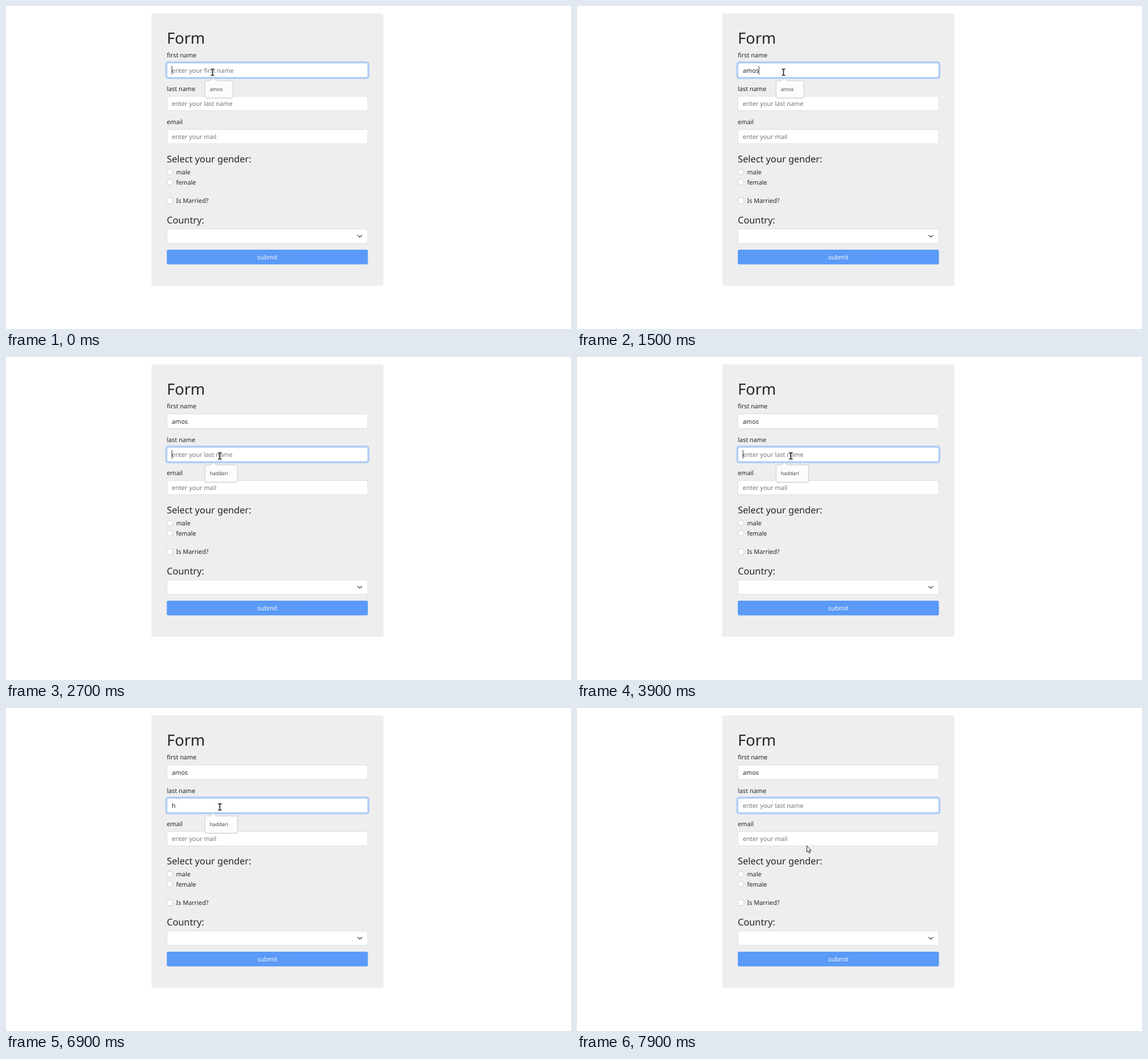
An HTML page for the animation above (8 s loop, 989x566 px).

```html
<!DOCTYPE html>
<html lang="en">
<head>
<meta charset="utf-8">
<title>Form</title>
<style>
html, body { margin: 0; width: 100%; height: 100%; overflow: hidden; background: #fff; }
svg { display: block; width: 989px; height: 566px; }
text { font: 16px "Noto Sans", sans-serif; fill: #212529; text-rendering: geometricPrecision; white-space: pre; }
.h1 { font-size: 40px; }
.h4 { font-size: 24px; }
.box { fill: #fff; stroke: #ced4da; }
.box.on { stroke: #86b7fe; }
.ring { fill: #0d6efd; fill-opacity: .25; visibility: hidden; }
.on + .x, .ring.on { visibility: visible; }
.hint { fill: #6c757d; }
.check { fill: #fff; stroke: #000; stroke-opacity: .25; }
.popup text { font-size: 8.75px; fill: #45474a; }
.popup path { fill: #fcfcfc; stroke: #c6c6c8; stroke-width: .8; }
</style>
</head>
<body>
<svg viewBox="0 0 989 566">
  <defs>
    <filter id="soft" x="-20%" y="-20%" width="140%" height="150%">
      <feDropShadow dx="0" dy=".6" stdDeviation=".6" flood-opacity=".18"/>
    </filter>
  </defs>
  <g transform="translate(254.4 13) scale(.677)">
    <rect width="600" height="705" rx="5" fill="#eee"/>
    <text class="h1" x="40" y="79">Form</text>
    <g id="fields"></g>
    <text class="h4" x="40" y="385.2">Select your gender:</text>
    <circle class="check" cx="48" cy="410.8" r="7.5"/>
    <text x="64" y="417">male</text>
    <circle class="check" cx="48" cy="436.8" r="7.5"/>
    <text x="64" y="443">female</text>
    <rect class="check" x="40.5" y="477.3" width="15" height="15" rx="3.5"/>
    <text x="64" y="491">Is Married?</text>
    <text class="h4" x="40" y="544.2">Country:</text>
    <rect class="box" x="40.5" y="558.1" width="519" height="37" rx="3.5"/>
    <path d="M532.5 574.3l5.5 4.7 5.5-4.7" transform="translate(1 0)" fill="none" stroke="#343a40" stroke-width="1.7" stroke-linecap="round" stroke-linejoin="round"/>
    <g opacity=".65">
      <rect x="40" y="611.6" width="520" height="38" rx="4" fill="#0d6efd"/>
      <text x="300" y="636.6" text-anchor="middle" style="fill:#fff">submit</text>
    </g>
  </g>
  <rect id="caret" width="1" height="15" fill="#212529" opacity=".9"/>
  <g id="popups"></g>
  <g id="beam" fill="none" stroke-linecap="round">
    <path id="beamShape" d="M-2.4-5.5Q0-5.5 0-4.2V4.2Q0 5.5-2.4 5.5M2.4-5.5Q0-5.5 0-4.2M0 4.2Q0 5.5 2.4 5.5" stroke="#fff" stroke-width="3"/>
    <use href="#beamShape" style="display:none"/>
    <path d="M-2.4-5.5Q0-5.5 0-4.2V4.2Q0 5.5-2.4 5.5M2.4-5.5Q0-5.5 0-4.2M0 4.2Q0 5.5 2.4 5.5" stroke="#1c1c1c" stroke-width="1.6"/>
  </g>
  <path id="arrow" d="M.5.6V11.5L3 9.3 4.7 13.2 6.5 12.4 4.9 8.6H8.4Z" fill="#f8f8f8" stroke="#222" stroke-width="1" stroke-linejoin="round"/>
</svg>
<script>
const LOOP = 8000, SCALE = 0.677, TEXT_X = 290.28;
const FIRST = "amos", LAST = "haddari";
const $ = id => document.getElementById(id);

function add(parent, tag, attrs, content = "") {
  const el = document.createElementNS("http://www.w3.org/2000/svg", tag);
  for (const k in attrs) el.setAttribute(k, attrs[k]);
  el.textContent = content;
  return parent.appendChild(el);
}

const fields = [
  ["first name", "enter your first name"],
  ["last name", "enter your last name"],
  ["email", "enter your mail"]
].map(([label, hint], i) => {
  const y = 128 + 86 * i, g = $("fields");
  add(g, "text", { x: 40, y: y - 13.8 }, label);
  const ring = add(g, "rect", { class: "ring", x: 36, y: y - 4, width: 528, height: 46, rx: 8 });
  const box = add(g, "rect", { class: "box", x: 40.5, y: y + 0.5, width: 519, height: 37, rx: 3.5 });
  const text = add(g, "text", { class: "hint", x: 53, y: y + 25 }, hint);
  return { hint, ring, box, text };
});

const popups = [[FIRST, 131, 397.2], [LAST, 189.2, 405.2]].map(([name, y, right]) => {
  const g = add($("popups"), "g", { class: "popup", filter: "url(#soft)" });
  const d = `M350.5 ${y}H358L363 ${y - 4.6} 368 ${y}H${right - 2}q2 0 2 2v${26}q0 2-2 2H350.5q-2 0-2-2V${y + 2}q0-2 2-2Z`;
  add(g, "path", { d });
  add(g, "text", { x: 356.7, y: y + 17.8 }, name);
  return g;
});

// Each track lists [start ms, value...]; values hold until the next step.
const focusTrack = [[0, 0], [2700, 1]];
const typedTracks = [
  [[0, 0], [1100, 1], [1300, 3], [1500, 4]],
  [[0, 0], [4600, 1], [5900, 2], [6900, 1], [7100, 0]]
];
const caretTrack = [
  [0, 1], [300, 0], [900, 1], [2000, 0], [2700, 1], [3300, 0], [3900, 1], [4500, 0],
  [4600, 1], [5200, 0], [5800, 1], [6500, 0], [7100, 1], [7700, 0]
];
const popupTracks = [
  [[0, 1], [1600, 0.5], [1700, 0]],
  [[0, 0], [2700, 1], [7200, 0]]
];
const mouseTrack = [
  [0, "beam", 361.5, 116], [2000, "beam", 362, 120], [2100, "arrow", 366, 138],
  [2200, "beam", 371, 165], [2300, "arrow", 373, 182], [2400, "beam", 374.3, 173.4],
  [7600, "beam", 376, 179], [7700, "arrow", 390, 206],
  [7800, "arrow", 403, 275], [7900, "arrow", 401.8, 241]
];

const at = (track, t) => track.findLast(step => step[0] <= t).slice(1);

function draw(t) {
  const [focus] = at(focusTrack, t);
  fields.forEach((f, i) => {
    f.ring.classList.toggle("on", i === focus);
    f.box.classList.toggle("on", i === focus);
    if (i > 1) return;
    const typed = [FIRST, LAST][i].slice(0, at(typedTracks[i], t)[0]);
    const shown = typed || f.hint;
    if (f.text.textContent !== shown) f.text.textContent = shown;
    f.text.classList.toggle("hint", !typed);
    popups[i].style.opacity = at(popupTracks[i], t)[0];
    if (i === focus) {
      const width = typed ? f.text.getComputedTextLength() * SCALE : 0;
      $("caret").setAttribute("x", Math.floor(TEXT_X + width));
      $("caret").setAttribute("y", 105 + 58 * i);
    }
  });
  $("caret").style.visibility = at(caretTrack, t)[0] ? "visible" : "hidden";
  const [shape, x, y] = at(mouseTrack, t);
  for (const id of ["beam", "arrow"]) {
    $(id).style.visibility = id === shape ? "visible" : "hidden";
    $(id).setAttribute("transform", `translate(${x} ${y})`);
  }
}

const start = performance.now();
function tick() {
  draw((performance.now() - start) % LOOP);
  requestAnimationFrame(tick);
}
tick();
</script>
</body>
</html>
```
